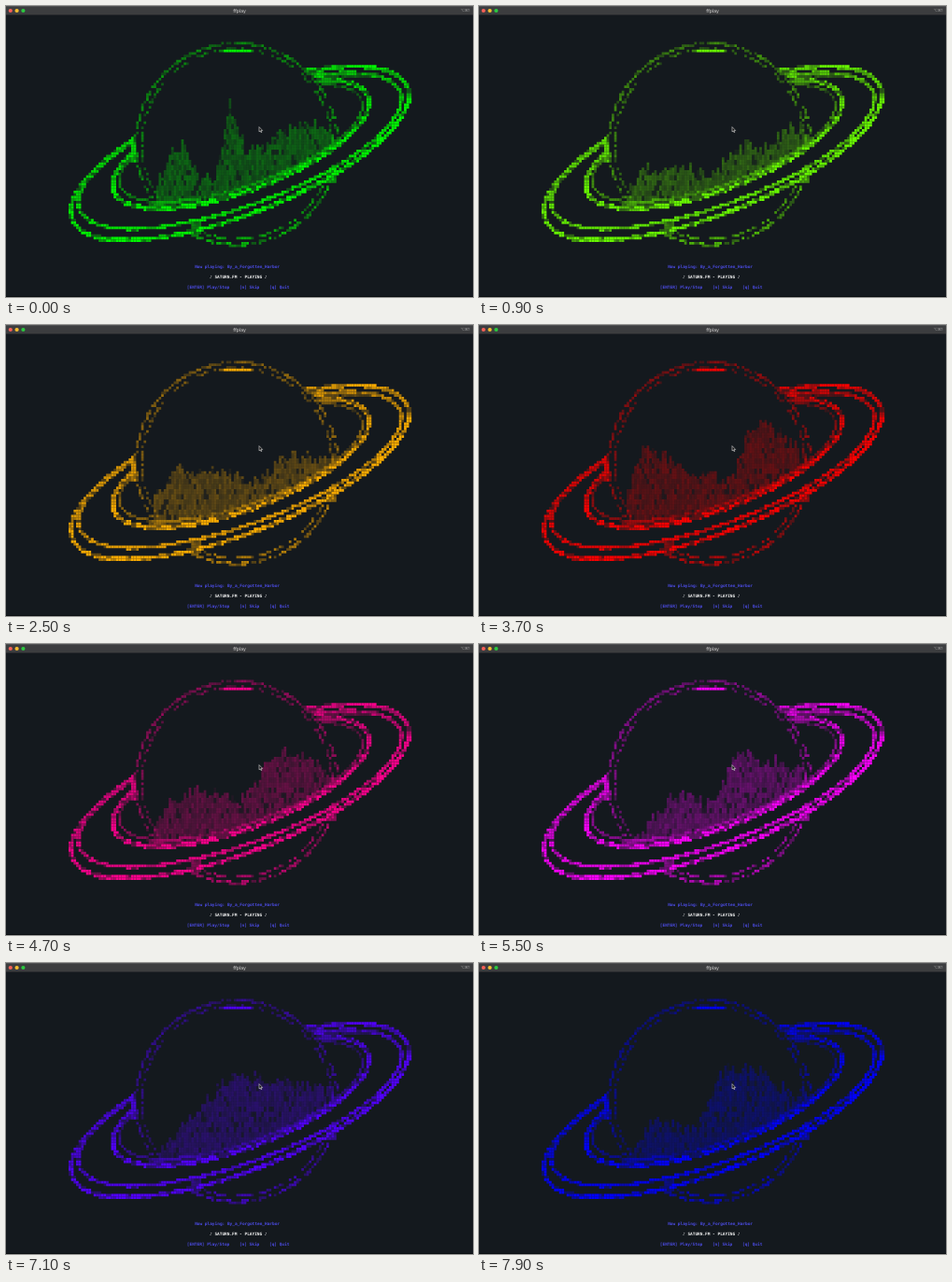
Write an HTML page with a canvas that moves like this. It is 500 px wide and 312 px high and loops after 8 s.

```html
<!DOCTYPE html>
<html lang="en">
<head>
<meta charset="utf-8">
<title>Saturn player</title>
<style>
  html, body { margin: 0; width: 100%; height: 100%; overflow: hidden; background: #14191e; }
  canvas, svg { position: absolute; left: 0; top: 0; width: 500px; height: 312px; }
  text { text-anchor: middle; text-rendering: geometricPrecision; white-space: pre; }
  .term { font: bold 4.45px "DejaVu Sans Mono", monospace; fill: #4d4de8; }
  .term .status { fill: #f4f4f4; }
  .bar { font: 500 5px Inter, "DejaVu Sans", sans-serif; fill: #c4c4c4; }
</style>
</head>
<body>
<canvas id="art" width="500" height="312"></canvas>
<svg viewBox="0 0 500 312">
  <rect width="500" height="9.5" fill="#3c3d3f"/>
  <rect width="500" height=".7" fill="#58595b"/>
  <circle cx="4.8" cy="5" r="2.1" fill="#f95f57"/>
  <circle cx="11.6" cy="5" r="2.1" fill="#f5bd2f"/>
  <circle cx="18.4" cy="5" r="2.1" fill="#2bc840"/>
  <g class="bar">
    <text x="250" y="6.6">ffplay</text>
    <text x="491.5" y="6.3" font-size="4" fill="#929292" style="font-size:4.2px">⌥⌘1</text>
  </g>
  <g class="term">
    <text x="247.6" y="280.5">Now playing: By_a_Forgotten_Harbor</text>
    <text x="248.8" y="291.5" class="status">♪ SATURN.FM - PLAYING ♪</text>
    <text x="248.6" y="302.5">[ENTER] Play/Stop    [n] Skip    [q] Quit</text>
  </g>
  <path d="M271 129.6v5.2l1.2-1 .8 1.8 .9-.4-.8-1.7h1.6z" fill="#111" stroke="#ddd" stroke-width=".6"/>
  <path d="M0 311.5H500" stroke="#0b0e11"/>
</svg>
<script>
const LOOP = 8000, STEP = 200, COL = 2.68, ROW = 2.75;
const ctx = document.getElementById('art').getContext('2d');
const planet = { x: 247, y: 148, r: 109 };

// Sheared ellipses: w and h are half extents, k tilts them.
const ellipse = (x, y, w, h, k) => ({ x, y, w, h, k, s: Math.sqrt(1 - k * k) });
const outer = ellipse(250.5, 157.8, 181, 93, -.67);
const middle = ellipse(250.5, 155.3, 173, 83.5, -.67);
const inner = ellipse(251.5, 148, 137, 69, -.64);
const lining = ellipse(251.5, 147, 130, 63, -.64);
const rings = [[outer, 2.3, 1], [middle, 1.9, .9], [inner, 2.5, 1], [lining, 1.5, .5]];

// Extra density where rings meet the planet: x, y, half width, half height, alpha.
const clumps = [
  [136, 157, 2.8, 11, .9], [336, 73, 5, 5, .9], [347, 77, 9, 6, .35],
  [349, 183, 5, 8, .55], [203, 238, 6, 6, .5], [380, 65, 16, 2, 1],
  [378, 74, 20, 2, .35], [115, 250, 16, 2, .8], [145, 250, 9, 2, .6],
  [161, 215, 9, 5, .45], [248.5, 49, 15, 1.6, 1]
];

// Steps at which hue and skyline are known; skyline tops are 16px apart from x = 160.
const keys = [
  [0, 120, [198, 150, 148, 182, 182, 103, 150, 152, 136, 130, 124, 124, 134]],
  [5, 95, [195, 168, 178, 176, 170, 178, 172, 156, 142, 150, 140, 126, 130]],
  [13, 41, [182, 156, 152, 154, 152, 158, 163, 164, 148, 136, 140, 138, 136]],
  [19, 0, [178, 126, 136, 144, 157, 158, 160, 162, 112, 100, 112, 126, 140]],
  [28, -60, [212, 196, 180, 160, 158, 168, 164, 118, 112, 124, 122, 132, 140]],
  [33, -86, [205, 190, 172, 135, 108, 88, 118, 132, 134, 132, 128, 132, 128]],
  [40, -120, [205, 180, 166, 172, 176, 158, 116, 108, 110, 116, 128, 136, 142]]
];

const mix = (a, b, p) => a + (b - a) * p;
const hash = (a, b) => {
  const n = Math.sin(a * 12.9898 + b * 78.233) * 43758.5453;
  return n - Math.floor(n);
};

// Signed pixel distance to an ellipse, and which half the point is on.
function locate(e, x, y) {
  const u = (x - e.x) / e.w, v = ((y - e.y) / e.h - e.k * u) / e.s;
  const r = Math.hypot(u, v) || 1e-6;
  const gx = (u - v * e.k / e.s) / (r * e.w), gy = v / (r * e.s * e.h);
  return { d: (r - 1) / Math.hypot(gx, gy), front: v > 0 };
}

function frontY(e, x) {
  const u = (x - e.x) / e.w;
  return e.y + e.h * (e.k * u + e.s * Math.sqrt(Math.max(0, 1 - u * u)));
}

function artAlpha(x, y, c, r) {
  const dist = Math.hypot(x - planet.x, y - planet.y);
  const grain = hash(c >> 1, r), fine = hash(c + 31, r + 7);
  let alpha = 0;
  for (const [e, half, power] of rings) {
    const { d, front } = locate(e, x, y);
    if (Math.abs(d) > half || (!front && dist < planet.r + 1)) continue;
    const level = grain < .58 ? 1 : grain < .82 ? .72 : .32;
    alpha = Math.max(alpha, level * power * (front ? 1 : .85));
  }
  for (const [cx, cy, w, h, power] of clumps) {
    if (Math.abs(x - cx) < w && Math.abs(y - cy) < h)
      alpha = Math.max(alpha, power * (power === 1 ? 1 : .55 + .45 * fine));
  }
  const o = locate(outer, x, y);
  const covered = o.front && o.d < 2 && locate(inner, x, y).d > -2;
  if (!covered) {
    const low = o.front && o.d > 0 ? 1.35 : 1;
    if (Math.abs(dist - planet.r + 1) < 1.5 && fine < .8)
      alpha = Math.max(alpha, (.2 + .38 * grain) * low);
    if (Math.abs(dist - planet.r + 7) < 1.3 && fine < .58)
      alpha = Math.max(alpha, (.16 + .34 * grain) * low);
  }
  return alpha;
}

const art = [];
for (let r = 13; r < 95; r++) {
  for (let c = 24; c < 164; c++) {
    const alpha = artAlpha((c + .5) * COL, (r + .5) * ROW, c, r);
    if (alpha) art.push([c, r, alpha]);
  }
}

function cell(c, r, alpha) {
  ctx.globalAlpha = Math.min(1, alpha);
  ctx.fillRect(c * COL, r * ROW, COL, ROW);
}

function drawBars(step, from, to, p) {
  for (let c = 59; c < 132; c++) {
    const x = (c + .5) * COL;
    const at = Math.min(11.99, Math.max(0, (x - 160) / 16)), i = Math.floor(at);
    const height = tops => mix(tops[i], tops[i + 1], at - i);
    const top = mix(height(from), height(to), p) + (hash(c, step + 3) - .4) * 15;
    const base = frontY(inner, x) - 2;
    for (let r = Math.ceil(top / ROW); (r + .5) * ROW < base; r++) {
      if (Math.hypot(x - planet.x, (r + .5) * ROW - planet.y) > planet.r - 3) continue;
      const grain = hash(c + step, r >> 1);
      cell(c, r, grain < .1 ? .06 : .16 + .2 * grain);
    }
  }
}

function draw(step) {
  const n = Math.max(1, keys.findIndex(k => k[0] >= step));
  const [s0, h0, from] = keys[n - 1], [s1, h1, to] = keys[n];
  const p = (step - s0) / (s1 - s0);
  ctx.globalAlpha = 1;
  ctx.fillStyle = '#14191e';
  ctx.fillRect(0, 0, 500, 312);
  ctx.fillStyle = `hsl(${(mix(h0, h1, p) + 360) % 360}, 100%, 49%)`;
  drawBars(step, from, to, p);
  for (const [c, r, alpha] of art) cell(c, r, alpha);
}

let shown = -1;
function tick() {
  const step = Math.floor((performance.now() % LOOP + STEP / 2) / STEP);
  if (step !== shown) draw(shown = step);
  requestAnimationFrame(tick);
}
tick();
</script>
</body>
</html>
```
